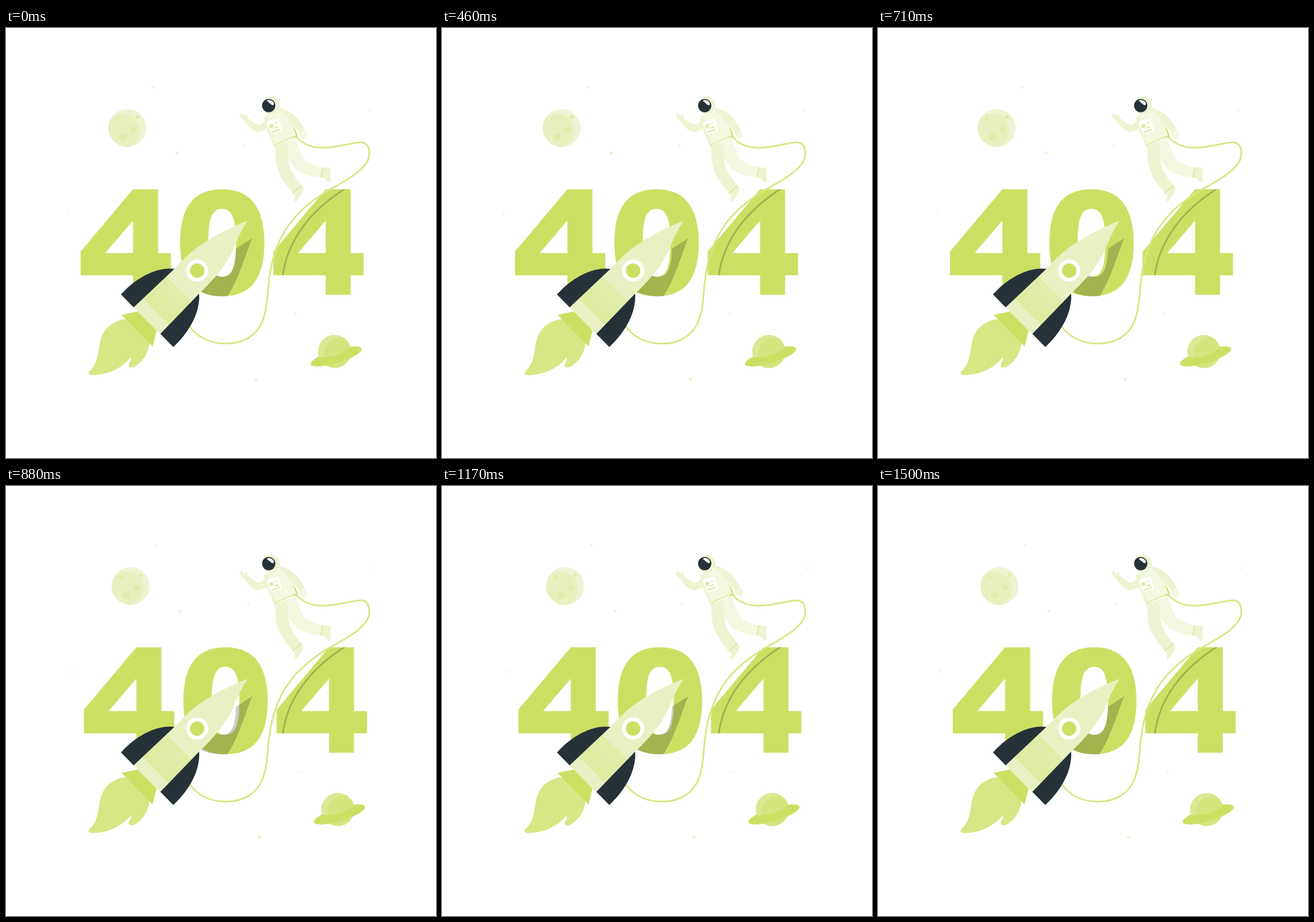
An HTML page without scripts for the animation above (1540 ms loop, 748x748 px).

```html
<!DOCTYPE html>
<html lang="en">
<head>
<meta charset="utf-8">
<title>404</title>
<style>
  html, body { margin: 0; height: 100%; overflow: hidden; background: #fff; }
  svg { display: block; width: 100vw; height: 100vh; }
  .green { fill: #cbe063; }
  .soft { fill: #d7e785; }
  .pale { fill: #eef4d2; }
  .faint { fill: #f3f8e0; }
  .mint { fill: #e0eca8; }
  .dark { fill: #263238; }
  .white { fill: #fff; }
  .shade { opacity: .2; }
  .line { fill: none; stroke: #d7e785; stroke-width: 3; }
  .trim { fill: none; stroke: #dfeba6; stroke-width: 2.4; }
  .drift { animation: shake 1540ms linear infinite; }

  /* Sideways shake, 150 ms per swing */
  @keyframes shake {
    0% { transform: translateX(-.25px); }
    8.12%, 86.04% { transform: translateX(-1.5px); }
    17.86%, 76.3% { transform: translateX(3px); }
    27.6%, 47.08%, 66.56% { transform: translateX(-6px); }
    37.34%, 56.82% { transform: translateX(6px); }
    95.78% { transform: translateX(0); }
    100% { transform: translateX(-.4px); }
  }
</style>
</head>
<body>
<svg viewBox="0 0 748 748" role="img" aria-label="404">
  <defs>
    <path id="four" fill-rule="evenodd" clip-rule="evenodd" d="M221.2 280.5H264.7V391.5H287.2V430.2H264.7V464H221.2V430.2H130V389ZM221.2 335L173 391.5H221.2Z"/>
    <path id="zero" fill-rule="evenodd" clip-rule="evenodd" d="M303 373.5C303 312 327 280.5 376.2 280.5S449.7 312 449.7 373.5S427 466.7 376.2 466.7S303 435 303 373.5ZM352.2 373.5C352.2 414 358 432.7 376.2 432.7S400.3 414 400.3 373.5S394 314.5 376.2 314.5S352.2 332 352.2 373.5Z"/>
    <circle id="globe" cx="571.7" cy="562.7" r="28.7"/>
    <clipPath id="inFour"><use href="#four" x="335.2"/></clipPath>
    <clipPath id="inZero"><use href="#zero"/></clipPath>
    <clipPath id="inMoon"><circle cx="211.3" cy="174" r="33"/></clipPath>
    <clipPath id="inGlobe"><use href="#globe"/></clipPath>
    <clipPath id="overRing"><path d="M538 528V572Q572 577 602 554V528Z"/></clipPath>
    <g id="planet">
      <use href="#globe" fill="#dae994"/>
      <circle cx="584" cy="569" r="31" fill="#d4e57f" clip-path="url(#inGlobe)"/>
    </g>
  </defs>

  <g class="drift">
    <g class="pale">
      <circle cx="256.3" cy="103" r="1.9"/>
      <circle cx="297.7" cy="218" r="2.7"/>
      <circle cx="415.7" cy="205" r="1.9"/>
      <circle cx="632.5" cy="143" r="1.7"/>
      <circle cx="109.2" cy="323" r="1.8"/>
      <circle cx="503.7" cy="496.5" r="1.7"/>
      <circle cx="435.2" cy="611" r="2.8"/>
      <circle cx="211.3" cy="174" r="33"/>
    </g>
    <circle cx="203" cy="179" r="30" fill="#e8f0c0" clip-path="url(#inMoon)"/>
    <g class="mint">
      <circle cx="194" cy="158" r="3"/>
      <circle cx="229" cy="155" r="3.3"/>
      <circle cx="221.5" cy="176.5" r="5.2"/>
      <circle cx="204" cy="190" r="6.5"/>
    </g>
    <use href="#planet"/>
    <ellipse class="green" rx="46.5" ry="11.5" transform="translate(574.7 571.3) rotate(-17)"/>
    <g clip-path="url(#overRing)"><use href="#planet"/></g>
    <g class="green">
      <use href="#four"/>
      <use href="#zero"/>
      <use href="#four" x="335.2"/>
    </g>
  </g>

  <g class="shade">
    <path clip-path="url(#inZero)" d="M428 366L400 384L325 430V470H383C402 442 410 414 428 366Z"/>
    <path clip-path="url(#inFour)" d="M592 278C535 314 489 365 481 434" fill="none" stroke="#000" stroke-width="3"/>
  </g>

  <path class="line" d="M503 186C517 206 540 211 568 207C590 204 605 199 617 199C629 199 632 208 632 219C632 248 580 270 552 288C500 321 471 361 460 422C453 462 457 478 447 508C437 535 413 549 383 549C352 549 332 537 318 517"/>

  <g id="rocket">
    <path class="soft" d="M219 506C190 505 170 520 164 545C160 562 161 582 147 595C141 600 144 604 150 604C175 603 200 594 217 573C219 580 211 585 214 589C217 593 226 589 233 582C243 573 248 562 250 546Z"/>
    <path class="green" d="M201 499L230 493L262 526L255 554Z"/>
    <path fill="#e9f1c4" d="M420 335.5C381 351 341 372 317 395L222 486L268 532.5L336 462C365 435 384 410 395 386C402 369 408 354 420 335.5Z"/>
    <path class="mint" d="M279 432L323 476L283 517L238 471Z"/>
    <path fill="#dae892" opacity=".35" d="M259 452L303 496L283 517L238 471Z"/>
    <path class="dark" d="M293 419C265 415 228 432 200 463.5L222 486ZM336 462C338 492 322 526 291 555L268.5 532Z"/>
    <circle class="white" cx="332.5" cy="422" r="19.3"/>
    <circle class="green" cx="332.5" cy="422" r="12.5"/>
  </g>

  <g id="astronaut">
    <path class="green" d="M488 162Q506 174 507 189L500 193Z"/>
    <path class="pale" d="M474 139C490 141 505 152 511 163Q518 174 523 184Q525 192 518 193L512 188Q510 180 500 170L478 160Z"/>
    <path class="faint" d="M511 181L520 178Q525 187 522 191L516 193Z"/>
    <path class="faint" d="M478 203L503 190C508 205 513 222 521 230C533 239 550 243 565 244L562 261C545 261 520 258 505 246C495 236 485 220 478 203Z"/>
    <path class="pale" d="M553 242L565 244L564 260Q567 268 562 269Q557 266 556 262L548 260Z"/>
    <path class="trim" d="M551.5 242L548 260"/>
    <path class="pale" d="M466 205L488 198C493 215 489 230 494 243C500 258 511 270 518 279L503 292C488 275 474 255 471 240C468 225 470 215 466 205Z"/>
    <path class="pale" d="M501 290L517 278Q518 288 511 293Q507 302 502 302Q501 297 503 291Z"/>
    <path class="trim" d="M499 287L514 274"/>
    <path class="pale" d="M456 155C448 163 445 168 440 168C433 167 426 161 420 156Q421 150 418 149L415 153Q411 146 407 150Q406 155 413 160C420 171 430 181 439 181C449 180 455 173 460 169Z"/>
    <path class="faint" d="M449 155Q462 147 478 145C490 154 501 172 505 188L466 205C460 190 449 171 449 155Z"/>
    <path class="pale" d="M449 155L456 151C456 170 464 188 470 203L466 205C460 190 449 171 449 155Z"/>
    <path class="trim" d="M466 204L505 187"/>
    <path class="white" d="M455 163L472 158Q474 158 475 160L480 177Q480 179 478 180L463 185Q461 185 460 183L454 166Q454 164 455 163Z"/>
    <g class="mint">
      <circle cx="461.5" cy="170.5" r="3.7"/>
      <circle cx="467" cy="166.5" r="1.3"/>
      <circle cx="470.5" cy="165" r="1.3"/>
      <path d="M466 173L473 170L474 173L467 175Z"/>
    </g>
    <path class="trim" d="M461.5 181.5L476 176.5"/>
    <circle class="pale" cx="460.5" cy="135" r="15.3"/>
    <circle class="dark" cx="457" cy="135" r="11.5"/>
    <path class="white" d="M454 127C455 123 467 126 466 133C463 137 460 131 454 127Z"/>
  </g>
</svg>
</body>
</html>
```
